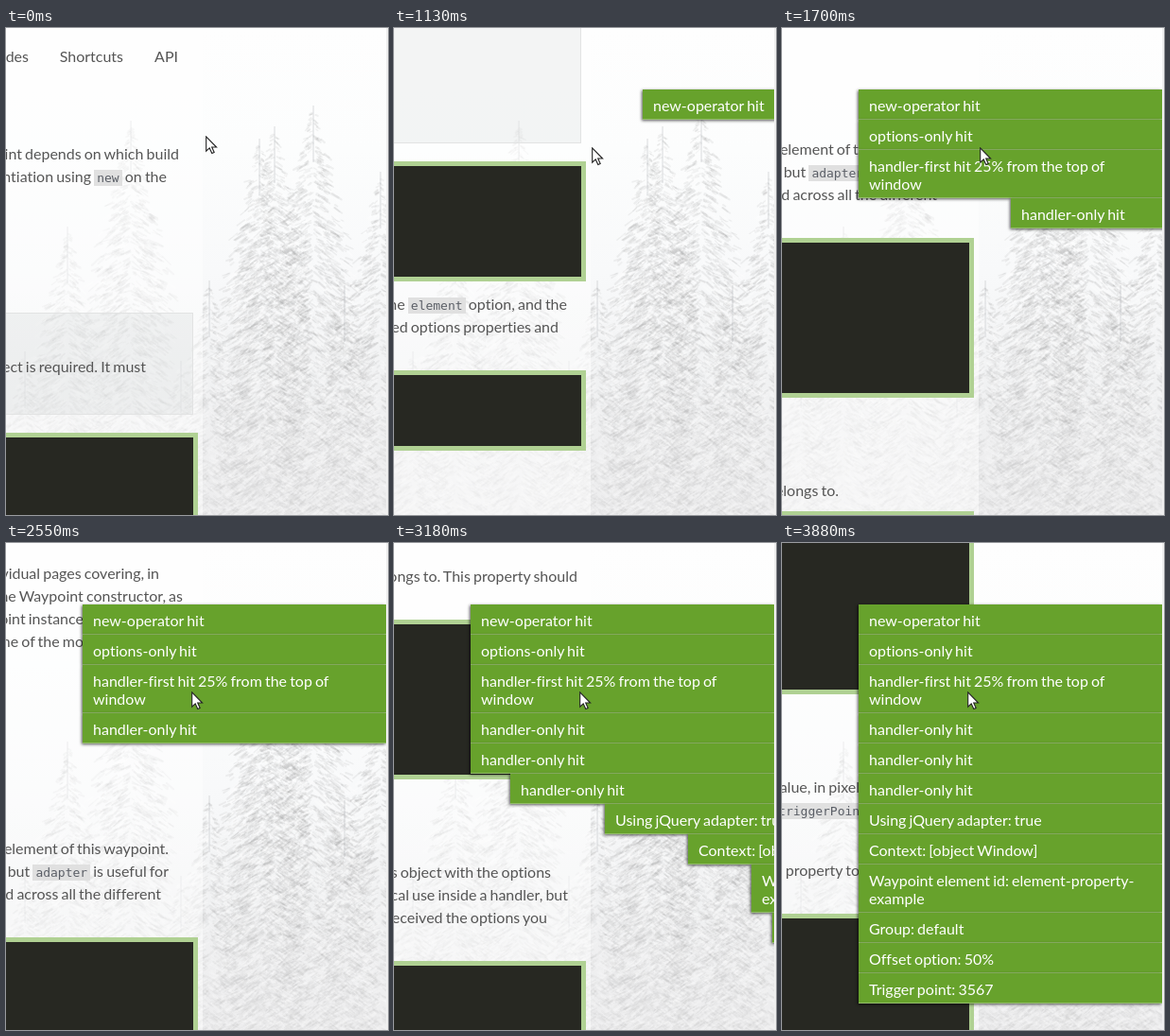
Animation, 404 px wide and 515 px high, one loop 3950 ms. Source, as an HTML page with a canvas:

```html
<!DOCTYPE html>
<html lang="en">
<head>
<meta charset="utf-8">
<title>Scroll notifications</title>
<style>
html, body { margin: 0; width: 100%; height: 100%; overflow: hidden; background: #fff; }
#stage { position: relative; width: 404px; height: 515px; overflow: hidden; color: #555;
  font: 16px/24px Lato, sans-serif; font-variant-ligatures: none; word-spacing: -1px; }
#stage > * { position: absolute; left: 0; top: 0; }
#woods { filter: blur(.6px); }
#veil { width: 208px; height: 515px; background: rgba(255,255,255,.5); }
#page { width: 404px; height: 0; will-change: transform; }
#page div { position: absolute; box-sizing: border-box; white-space: pre; }
#page i { position: absolute; left: 100%; font-style: normal; }
code { font: 13px/17px "DejaVu Sans Mono", monospace; color: #5a5e66; background: #e0e0e0; padding: 1px 3px; }
.note { left: -10px; width: 208px; background: rgba(90,100,100,.065); border: 1px solid #e2e3e3; }
.dark { left: -10px; width: 213px; background: #272822; border: 5px solid #b0d193; }
#edge { width: 2px; height: 515px; margin-left: 402px; background: #f0f0f0; }
#clip { width: 402px; height: 515px; overflow: hidden; }
#list { position: absolute; left: 81px; top: 65px; width: 321px; }
.hit { box-sizing: border-box; padding: 7px 11px 5px; line-height: 19px; white-space: pre; color: #fff;
  background: #67a22c; border-bottom: 1px solid #94bd6b; box-shadow: -1px 1px 3px rgba(0,0,0,.65); }
</style>
</head>
<body>
<div id="stage">
  <canvas id="woods" width="404" height="515"></canvas>
  <div id="veil"></div>
  <div id="page"></div>
  <div id="edge"></div>
  <div id="clip"><div id="list"></div></div>
  <svg id="cursor" width="14" height="21" viewBox="0 0 14 21">
    <path d="M.7 .9V16.2L4.2 12.9L6.8 18.6L9.2 17.5L6.7 12H11.6Z" fill="#fff" stroke="#222" stroke-width="1.1"/>
  </svg>
</div>
<script>
const LOOP = 3950, SLIDE = 400, LINE = 24;
const $ = id => document.getElementById(id);

// Screen refreshes: evenly spaced runs of [first, last, count].
const runs = [[440, 740, 5], [820, 1130, 5], [1200, 1700, 7], [1750, 1830, 2], [1980, 1980, 1],
  [2150, 2550, 6], [2630, 3180, 8], [3250, 3880, 9]];
const ticks = [0, ...runs.flatMap(([first, last, count]) =>
  Array.from({ length: count }, (_, i) => first + (last - first) * i / Math.max(1, count - 1)))];

// [time, scroll offset]: down, a turn back up, then down again into a glide.
const scrollKeys = [[0, 0], [400, 0], [740, 700], [1130, 1500], [1700, 2795], [1830, 2850],
  [2150, 2850], [2550, 2600], [2790, 2230], [3180, 3827]];
const glide = { start: 3180, distance: 452, decay: 115 };

// [time, x, y]; a missing x hides the pointer.
const cursorKeys = [[0, 211, 114], [970, 209, 126], [1830], [1980, 209, 126], [2150, 196, 157]];

// [start of slide, text]
const hits = [
  [947, 'new-operator hit'],
  [1130, 'options-only hit'],
  [1200, 'handler-first hit 25% from the top of\nwindow'],
  [1500, 'handler-only hit'],
  [2690, 'handler-only hit'],
  [2874, 'handler-only hit'],
  [2965, 'Using jQuery adapter: true'],
  [3037, 'Context: [object Window]'],
  [3109, 'Waypoint element id: element-property-\nexample'],
  [3160, 'Group: default'],
  [3250, 'Offset option: 50%'],
  [3480, 'Trigger point: 3567']
];

// Lines are [text, right edge]; a part after "|" continues past that edge.
const SHORT = ['', 0], BREAK = null;
const instanceParts = [
  [['the element of this waypoint.', 172], ['with it, but `adapter` is useful for', 172],
   ['standard across all the different', 164], SHORT],
  [['belongs to.', 60]],
  [['tied to.', 60]],
  [['belongs to. This property should', 194], SHORT],
  [['this object with the options', 166], ['typical use inside a handler, but', 184],
   ['received the options you', 162], SHORT],
  [['value, in pixel|s, where', 82], ['`triggerPoint`| is not', 93], SHORT, BREAK,
   ['special property to| force it', 82], SHORT]
];

function add(parent, className, html, style = {}) {
  const el = document.createElement('div');
  el.className = className;
  el.innerHTML = html;
  Object.assign(el.style, style);
  return parent.appendChild(el);
}

function buildPage() {
  let y = 0;
  const box = (kind, top, height) => add($('page'), kind, '', { top: top + 'px', height: height + 'px' });
  const line = ([text, right]) => {
    const html = text.replace(/`(.+?)`/g, '<code>$1</code>').replace(/\|(.*)/, '<i>$1</i>');
    add($('page'), '', html, { top: y - LINE / 2 + 'px', right: 404 - right + 'px' });
  };
  const para = (start, lines) => {
    y = start;
    for (const l of lines) {
      if (l === BREAK) { y += 16; continue; }
      line(l);
      y += LINE;
    }
  };
  const block = (height, top = y - 2) => {
    box('dark', top, height);
    y = top + height;
  };
  const notedBlock = (noteTop, blockTop, text) => {
    box('note', noteTop, blockTop - 19 - noteTop);
    if (text) para(noteTop + 57, [text]);
    block(127, blockTop);
  };

  y = 30;
  [['Guides', 24], ['Shortcuts', 124], ['API', 182]].forEach(line);
  para(133, [['point depends on which build', 183], ['instantiation using `new` on the', 170]]);
  notedBlock(301, 428, ['object is required. It must', 148]);

  notedBlock(752, 933, ['the only required property.', 148]);
  para(y + 23, [['for each of the elements', 150], ['the lone `#options-only`', 169],
    ['or Zepto builds, as elements', 182], SHORT, BREAK, ['argument to `waypoint`.', 129]]);

  notedBlock(1440, 1641);
  para(y + 24, [['the `element` option, and the', 183], ['merged options properties and', 174], SHORT]);
  block(85);

  para(2280, [['takes a handler function', 168], SHORT, SHORT]);
  block(127);
  para(2632, [['individual pages covering, in', 162], ['the Waypoint constructor, as', 187],
    ['Waypoint instance| has. Here', 82], ['some of the mo|st common', 82]]);

  y = 2825;
  for (const lines of instanceParts) {
    para(y + 98, lines);
    block(169);
  }
}

function drawWoods() {
  const c = $('woods').getContext('2d');
  let seed = 7;
  const rnd = () => (seed = seed * 16807 % 2147483647) / 2147483647;
  const wash = (from, ...colours) => {
    const g = c.createLinearGradient(0, from, 0, 515);
    colours.forEach((colour, i) => g.addColorStop(i / (colours.length - 1), colour));
    c.fillStyle = g;
    c.fillRect(0, from, 404, 515 - from);
  };
  // Boughs are short drooping dabs of shade and snow inside a cone.
  const tree = ([x, top]) => {
    for (let y = top; y < 515; y++) {
      const reach = Math.min((y - top) * .25 + 2, 46) * (.75 + .25 * Math.sin(y * .45 + x));
      for (let n = reach / 5 + rnd(); n > 0; n--) {
        const off = reach * (2 * rnd() - 1), len = 2 + Math.min(reach * .4, 8) * rnd();
        c.strokeStyle = rnd() < .54 ? 'rgba(145,148,150,.12)' : 'rgba(255,255,255,.28)';
        c.lineWidth = 1 + 1.5 * rnd();
        c.beginPath();
        c.moveTo(x + off, y);
        c.lineTo(x + off + Math.sign(off) * len, y + len * (.3 + .7 * rnd()));
        c.stroke();
      }
    }
    c.fillStyle = 'rgba(130,134,138,.18)';
    c.fillRect(x - .7, top - 8, 1.5, 60);
  };
  wash(0, '#fefefe', '#fcfdfd', '#f8f9fa', '#f1f2f3', '#ececed');
  c.lineCap = 'round';
  [[65, 218], [132, 106], [20, 350], [185, 360], [215, 275], [268, 125], [284, 112], [325, 90], [396, 160], [358, 280]]
    .forEach(tree);
  wash(280, 'rgba(238,238,239,0)', 'rgba(238,238,239,.55)');
}

function scrollAt(t) {
  if (t >= glide.start) {
    const left = Math.exp((glide.start - t) / glide.decay);
    return scrollKeys[scrollKeys.length - 1][1] + glide.distance * (1 - left);
  }
  const i = scrollKeys.findIndex(k => k[0] > t);
  const [t0, a] = scrollKeys[i - 1], [t1, b] = scrollKeys[i];
  return a + (b - a) * (t - t0) / (t1 - t0);
}
const lastWhere = (list, test) => list.filter(test).pop();
const swing = p => .5 - Math.cos(Math.PI * Math.min(1, Math.max(0, p))) / 2;

buildPage();
drawWoods();
const hitEls = hits.map(([, text]) => add($('list'), 'hit', text));

function render(t) {
  $('page').style.transform = `translateY(${-Math.round(scrollAt(t))}px)`;
  hits.forEach(([start], i) => {
    const p = swing((t - start) / SLIDE);
    hitEls[i].style.visibility = p > 0 ? 'visible' : 'hidden';
    hitEls[i].style.transform = `translateX(${Math.round(321 * (1 - p))}px)`;
  });
  const [, x, y] = lastWhere(cursorKeys, k => k[0] <= t);
  $('cursor').style.visibility = x ? 'visible' : 'hidden';
  if (x) $('cursor').style.transform = `translate(${x}px, ${y}px)`;
}

const began = performance.now();
function frame() {
  const now = (performance.now() - began) % LOOP;
  render(lastWhere(ticks, tick => tick <= now));
  requestAnimationFrame(frame);
}
frame();
</script>
</body>
</html>
```
